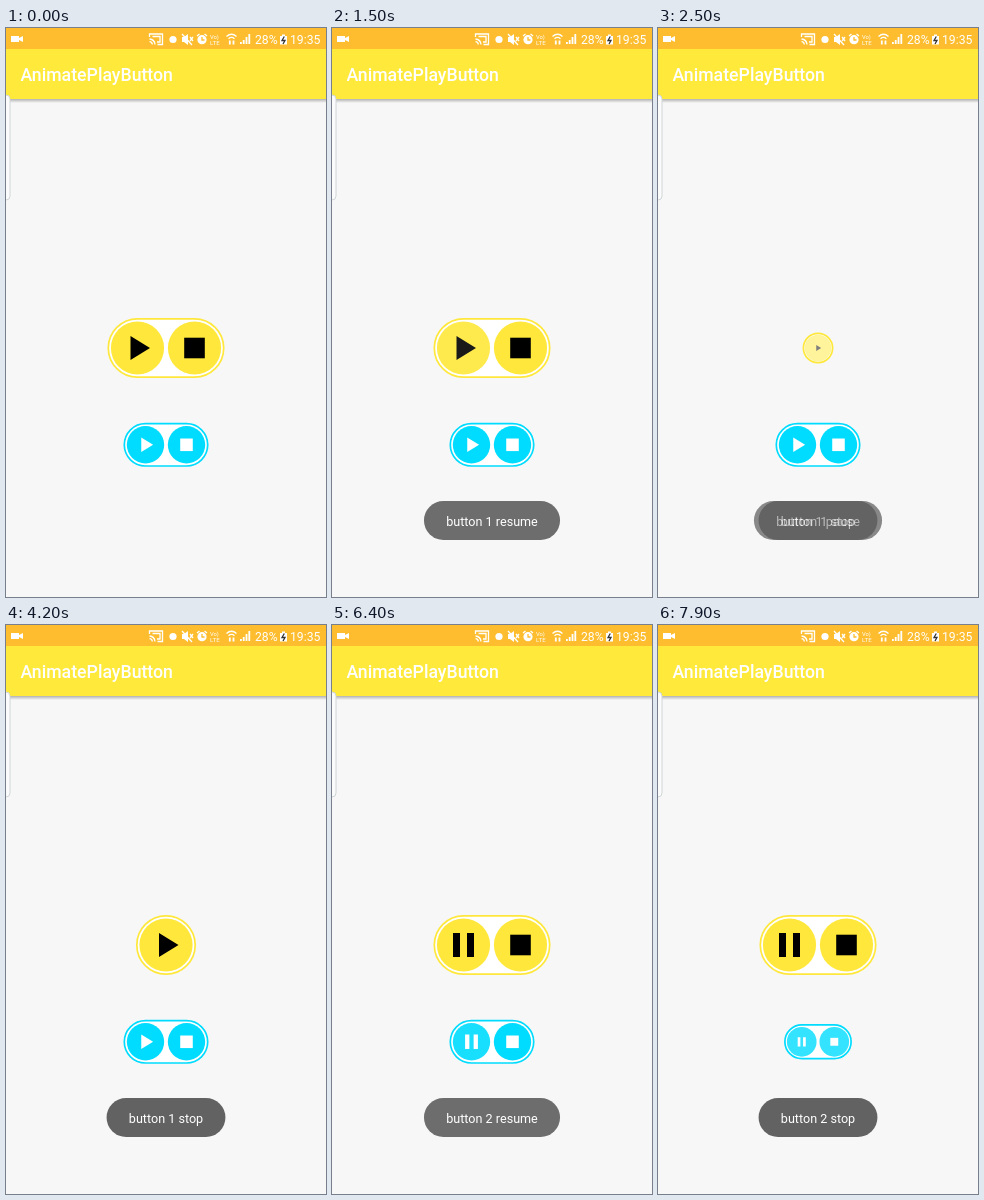
Animation, 320 px wide and 569 px high, one loop 8 s. Source, as an HTML page:

```html
<!DOCTYPE html>
<html lang="en">
<head>
<meta charset="utf-8">
<title>AnimatePlayButton</title>
<style>
  html, body { margin: 0; height: 100%; overflow: hidden; background: #f7f7f7; }
  svg { display: block; width: 100%; height: 100%; }
  text { font-family: Roboto, "Noto Sans", sans-serif; fill: #fff; }
</style>
</head>
<body>
<svg viewBox="0 0 320 569">
  <defs>
    <linearGradient id="shade" x2="0" y2="1">
      <stop stop-color="#000" stop-opacity=".28"/>
      <stop offset="1" stop-color="#000" stop-opacity="0"/>
    </linearGradient>
  </defs>
  <rect width="320" height="569" fill="#f7f7f7"/>
  <rect y="71" width="320" height="4" fill="url(#shade)"/>
  <rect width="320" height="71" fill="#ffe93a"/>
  <rect width="320" height="21" fill="#fdbd2e"/>
  <text x="14.5" y="53.2" font-size="17.7" font-weight="500">AnimatePlayButton</text>
  <rect x="-8" y="67" width="12" height="105" rx="4" fill="#fbfbfb" stroke="#cfd6d8"/>

  <!-- status bar -->
  <g fill="#fff">
    <path d="M5 8h8v2l4-2v6l-4-2v2h-8z"/>
    <circle cx="167" cy="11.5" r="3.6"/>
    <path d="M176 9h2l4-3v11l-4-3h-2z"/>
    <path d="M205 0"/>
    <path d="M234 16v-2h1.8v2zM236.8 16v-4h1.8v4zM239.6 16v-7h1.8v7zM242.4 16v-10h1.8v10z"/>
    <path d="M274 8h2v-1.5h3v1.5h2v8.500h-7z"/>
    <circle cx="196" cy="11.7" r="4.6"/>
  </g>
  <path d="M278.300 8.500l-2.300 4h3l-2 3.500" fill="none" stroke="#333" stroke-width="1.300"/>
  <g fill="none" stroke="#fff" stroke-width="1.300">
    <path d="M143.500 9v-3h13v10.500h-5M143.500 11a6 6 0 0 1 5.500 5.500M143.500 13.700a3 3 0 0 1 2.800 2.800M146.500 8.500h7.500v5.500h-3"/>
    <path d="M176 6l10 11M184 9l3 4M187 9l-3 4"/>
    <path d="M191 8l2.500-2M201 8l-2.500-2"/>
    <path d="M220.500 8.500q5-4.500 10 0M222.500 10.700q3-2.500 6 0"/>
    <path d="M223.800 12.500v4M227.500 12.500v4" stroke-width="1.800"/>
    <path d="M196 9v3h2.500" stroke="#fdbd2e"/>
  </g>
  <text x="204" y="10.600" font-size="5.800">Vo)</text>
  <text x="204" y="16.600" font-size="6.200">LTE</text>
  <text x="249" y="16" font-size="12.200">28%</text>
  <text x="284" y="16" font-size="12.200">19:35</text>

  <g id="buttons"></g>
  <g id="toasts"></g>
</svg>
<script>
const LOOP = 8000, STEP = 100;
const $ = id => document.getElementById(id);
const clamp = x => Math.max(0, Math.min(1, x));
const ramp = (t, a, b) => clamp((t - a) / (b - a));
const ease = p => (1 - Math.cos(Math.PI * p)) / 2;

const icons = {
  play: 'M-7-12L12.5 0L-7 12z',
  pause: 'M-10.500-12h7v24h-7zM3.500-12h7v24h-7z',
  stop: 'M-10.300-10.300h20.600v20.600h-20.600z'
};

const looks = [
  { y: 320, color: '#ffe83b', ink: '#000', half: 28.5, r: 26.6, ring: 29.2, icon: 1 },
  { y: 416.8, color: '#00dcff', ink: '#fff', half: 20.5, r: 18.7, ring: 21.2, icon: 0.61 }
];

function disc(b, x, name, size, alpha) {
  return `<g transform="translate(${x} 0) scale(${size})" opacity="${alpha}">
    <circle r="${b.r}" fill="${b.color}"/>
    <path d="${icons[name]}" transform="scale(${b.icon * size})" fill="${b.ink}"/></g>`;
}

function button(b, { open, icon, size, dim }) {
  const half = open ? b.half * size : 0, ring = b.ring * size;
  return `<g transform="translate(160 ${b.y})">
    <rect x="${-half - ring}" y="${-ring}" width="${2 * (half + ring)}" height="${2 * ring}"
      rx="${ring}" fill="#fff" stroke="${b.color}" stroke-width="1.7"/>
    ${disc(b, -half, icon, size, size * dim)}
    ${open ? disc(b, half, 'stop', size, size) : ''}</g>`;
}

// Shrinks away until mid, then grows back in the new shape
const pop = (t, start, mid, end) =>
  t < mid ? 1 - ease(ramp(t, start, mid)) : ease(ramp(t, mid, end));

// Brief fade of the tapped disc
const dip = (t, start) => 1 - 0.4 * Math.sin(Math.PI * ramp(t, start, start + 600));

function firstState(t) {
  const open = t < 2300 || t >= 4520;
  const playing = (t >= 600 && t < 1250) || t >= 4520;
  return {
    open, icon: playing ? 'pause' : 'play',
    size: Math.min(pop(t, 1900, 2300, 2700), pop(t, 4200, 4520, 4900)),
    dim: dip(t, 300) * dip(t, 950)
  };
}

function secondState(t) {
  return {
    open: true, icon: t >= 6150 ? 'pause' : 'play',
    size: pop(t, 7780, 8180, 8580), dim: dip(t, 5850)
  };
}

// label, fade in from/to, fade out from/to
const toasts = [
  ['button 1 resume', 500, 900, 1470, 1900],
  ['button 1 pause', 1550, 1950, 2400, 2800],
  ['button 1 stop', 2320, 2720, 4450, 4850],
  ['button 1 play', 4500, 4900, 5950, 6380],
  ['button 2 resume', 6030, 6430, 7350, 7750],
  ['button 2 stop', 7400, 7800, 9000, 9400]
];

$('toasts').innerHTML = toasts.map(([label]) => `<g>
  <rect y="473" height="39" rx="19.500" fill="#000" fill-opacity=".6"/>
  <text x="160" y="497.600" font-size="12.600" text-anchor="middle">${label}</text></g>`).join('');
const toastNodes = [...$('toasts').children];
for (const node of toastNodes) {
  const [box, text] = node.children;
  const width = text.getComputedTextLength() + 44.5;
  box.setAttribute('x', 160 - width / 2);
  box.setAttribute('width', width);
}

function draw(now) {
  const t = Math.floor((now % LOOP) / STEP) * STEP;
  $('buttons').innerHTML = button(looks[0], firstState(t)) + button(looks[1], secondState(t));
  toasts.forEach(([, a, b, c, d], i) =>
    toastNodes[i].setAttribute('opacity', ramp(t, a, b) * (1 - ramp(t, c, d))));
}

let start;
function frame(now) {
  start ??= now;
  draw(now - start);
  requestAnimationFrame(frame);
}
draw(0);
requestAnimationFrame(frame);
</script>
</body>
</html>
```
